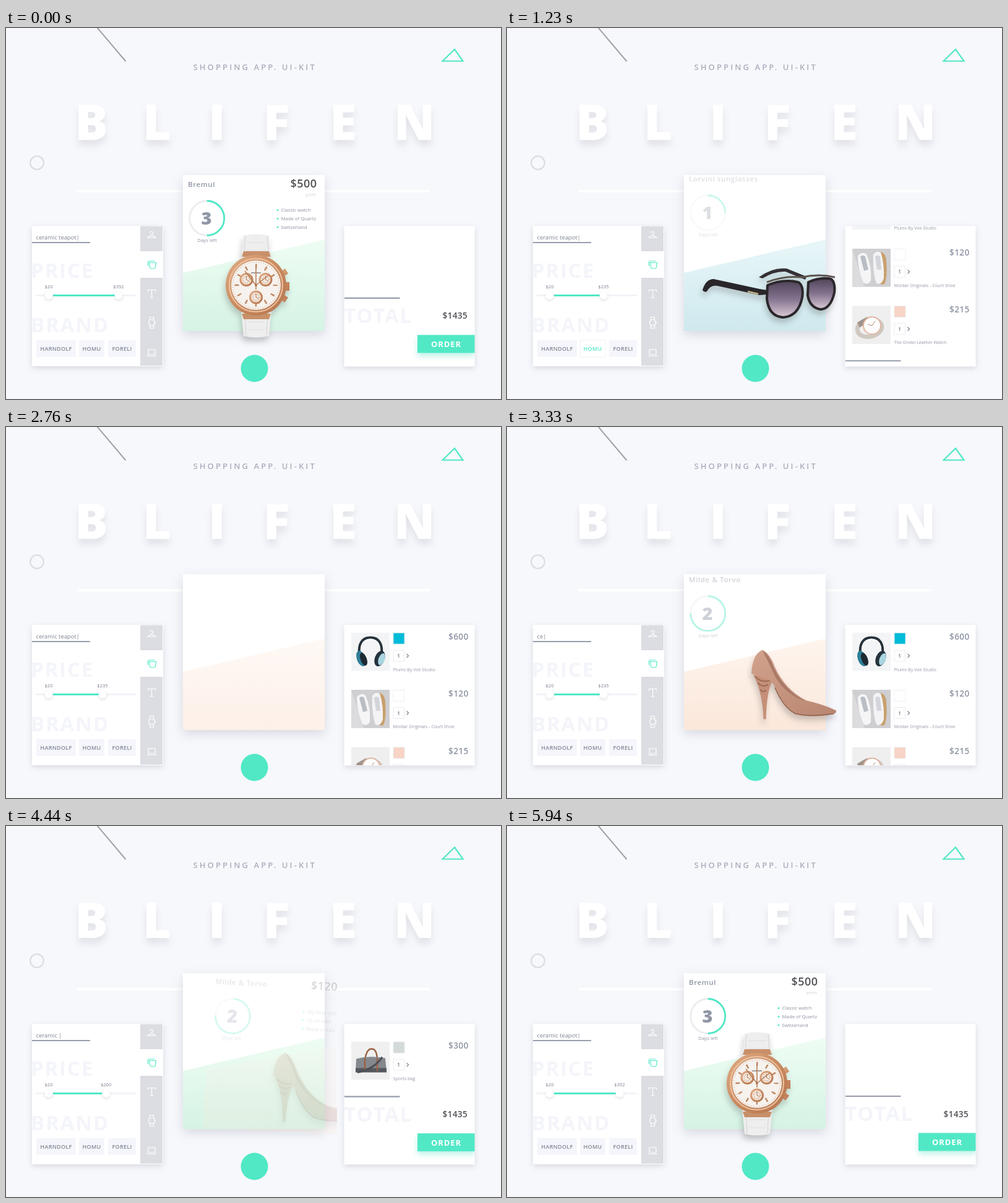
Animation, 800 px wide and 600 px high, one loop 5970 ms. Source, as an HTML page:

```html
<!DOCTYPE html>
<html lang="en">
<head>
<meta charset="utf-8">
<title>Shopping app UI kit</title>
<style>
html, body { margin: 0; width: 100%; height: 100%; overflow: hidden; background: #f7f8fc; }
svg { display: block; width: 800px; height: 600px; font-family: "Open Sans", "Noto Sans", sans-serif; }
.title { font-size: 80px; font-weight: 800; fill: #fff; text-anchor: middle; filter: drop-shadow(0 9px 6px rgba(70, 70, 80, .12)); }
.subtitle { font-size: 13px; font-weight: 600; letter-spacing: 3.1px; fill: #a9aebb; }
.card { fill: #fff; filter: drop-shadow(0 3px 5px rgba(70, 75, 95, .18)); }
.main { filter: drop-shadow(0 6px 9px rgba(70, 75, 95, .18)); }
.ghost { font-size: 33px; font-weight: 700; letter-spacing: 1.8px; fill: #f4f5fa; }
.rule { stroke: #989dad; stroke-width: 2.2; }
.query { font-size: 9.4px; fill: #7b8190; }
.tick { font-size: 7.6px; fill: #7b8190; text-anchor: middle; }
.knob { fill: #fff; filter: drop-shadow(0 2px 2px rgba(60, 60, 80, .16)); }
.tag { font-size: 9px; font-weight: 600; letter-spacing: .3px; text-anchor: middle; }
.icon { fill: none; stroke: #fff; stroke-width: 1.2; stroke-linejoin: round; stroke-linecap: round; }
.name { font-size: 11.5px; font-weight: 600; letter-spacing: .6px; fill: #8f96a4; }
.price { font-size: 18px; font-weight: 600; letter-spacing: .5px; fill: #515256; text-anchor: end; }
.old { font-size: 7.5px; fill: #dfe0e5; text-anchor: end; text-decoration: line-through; }
.note { font-size: 7.8px; fill: #8b919e; }
.days { font-size: 29px; font-weight: 800; fill: #8f96a5; text-anchor: middle; }
.mid { text-anchor: middle; }
.cost { font-size: 13.5px; font-weight: 600; letter-spacing: .4px; fill: #8d94a3; text-anchor: end; }
.label { font-size: 7.2px; fill: #9398a6; }
.qty { font-size: 8px; font-weight: 600; fill: #6f7583; text-anchor: middle; }
.total { font-size: 13.7px; font-weight: 600; letter-spacing: .3px; fill: #505257; text-anchor: end; }
.order { font-size: 13px; font-weight: 700; letter-spacing: .9px; fill: #fff; text-anchor: middle; }
.button { fill: #51e8c6; filter: drop-shadow(0 5px 5px rgba(60, 220, 185, .35)); }
.product { filter: drop-shadow(-2px 7px 5px rgba(60, 60, 60, .25)); }
</style>
</head>
<body>
<svg viewBox="0 0 800 600">
  <defs>
    <clipPath id="stageClip"><rect x="266" y="238" width="269" height="290"/></clipPath>
    <clipPath id="cartClip"><rect x="547" y="320" width="210.5" height="227"/></clipPath>
    <clipPath id="thumbClip"><rect width="62" height="62"/></clipPath>
    <linearGradient id="lens" x2="0" y2="1">
      <stop stop-color="#4f4459"/><stop offset=".5" stop-color="#85748f"/><stop offset="1" stop-color="#dccbd7"/>
    </linearGradient>
    <linearGradient id="gold" x2="1" y2="1">
      <stop stop-color="#e0ad86"/><stop offset=".5" stop-color="#c98a60"/><stop offset="1" stop-color="#b5764f"/>
    </linearGradient>
    <linearGradient id="skin" x2="1" y2="1">
      <stop stop-color="#d3a28c"/><stop offset="1" stop-color="#b88670"/>
    </linearGradient>
  </defs>

  <path d="M147 -1L193.500 54" stroke="#a1a2a7" stroke-width="2"/>
  <path d="M705.500 53.500L725 34.500L738.500 53.500Z" fill="none" stroke="#51e8c6" stroke-width="2.200"/>
  <circle cx="50" cy="218" r="10.800" fill="none" stroke="#dcdde2" stroke-width="2.200"/>
  <text class="subtitle" x="302.500" y="67.500">SHOPPING APP. UI-KIT</text>
  <text class="title" x="138 244 341 437 545 660" y="181">BLIFEN</text>
  <path d="M115 264H685.500" stroke="#fff" stroke-width="4"/>

  <g id="filterCard">
    <rect class="card" x="42" y="320" width="212" height="227"/>
    <text class="ghost" x="40" y="404">PRICE</text>
    <text class="ghost" x="40" y="492">BRAND</text>
    <text class="query" id="query" x="48.500" y="341.500"></text>
    <path class="rule" d="M42 347H136"/>
    <path d="M48 432.500H210" stroke="#f1f2f6" stroke-width="2.500"/>
    <path id="bar" stroke="#51e8c6" stroke-width="3"/>
    <circle class="knob" cx="69" cy="432.500" r="6.500"/>
    <circle class="knob" id="knob" cy="432.500" r="6.500"/>
    <text class="tick" x="69" y="421">$20</text>
    <text class="tick" id="limit" y="421"></text>
    <g id="tags"></g>
    <rect x="217" y="320.500" width="36" height="225.500" fill="#dcdde2"/>
    <rect x="217" y="361" width="36" height="43" fill="#fff"/>
    <g class="icon">
      <path d="M233 331.500a2.300 2.300 0 1 1 3.500 1.800q-1 .7-1 2l7 3.700H228.500l7-3.700"/>
      <path stroke="#51e8c6" d="M231.500 379.500h11l-1.200 8q-.3 1.500-1.800 1.500h-5q-1.500 0-1.800-1.500zM229.500 384.500V379q0-2 2-2h8.500"/>
      <path d="M229.500 426v-2.500h12V426M235.500 423.500v12.500M233 436h5"/>
      <path d="M232.500 471.500v-4h6v4M232.500 481.500v4h6v-4M241 475.500v2"/><circle cx="235.500" cy="476.500" r="5"/>
      <path d="M230 520h11v8h-11zM228 530.500h15"/>
    </g>
  </g>

  <g id="cart">
    <rect class="card" x="546.500" y="320" width="211" height="227.500"/>
    <g clip-path="url(#cartClip)">
      <g id="items"></g>
      <g id="summary">
        <path class="rule" d="M547 0H636.500"/>
        <text class="ghost" x="546" y="40">TOTAL</text>
        <text class="total" id="total" x="746" y="33.500"></text>
        <rect class="button" x="665" y="59.500" width="93" height="29"/>
        <text class="order" x="711.500" y="79">ORDER</text>
      </g>
    </g>
  </g>

  <rect class="card main" x="286" y="238" width="229" height="252"/>
  <g id="wedges"></g>
  <g id="slides" clip-path="url(#stageClip)"></g>
  <circle cx="401.500" cy="550.500" r="22" fill="#51e8c6"/>
</svg>

<script>
const LOOP = 5970;
const CARD_HOLD = 2760;
const PITCH = 92.5;
const $ = id => document.getElementById(id);
const clamp = v => Math.max(0, Math.min(1, v));
const span = (t, from, length) => clamp((t - from) / length);
const outQuad = p => 1 - (1 - p) ** 2;
const inOut = p => p < .5 ? 4 * p ** 3 : 1 - (2 - 2 * p) ** 3 / 2;
const mix = (a, b, p) => a + (b - a) * p;
const move = (el, x, y) => el.setAttribute('transform', `translate(${x} ${y})`);

const subdial = (x, y) => `<circle cx="${x}" cy="${y}" r="9.500" fill="#f4e9df" stroke="url(#gold)" stroke-width="3"/>
  <circle cx="${x}" cy="${y}" r="5.500" fill="none" stroke="#c79a78" stroke-width="2" stroke-dasharray="1 2"/>
  <path d="M${x} ${y - 6}V${y}L${x + 4} ${y + 2}" stroke="#a8724f" fill="none"/>`;

const watchArt = `
  <path d="M384 336Q404 331 425 336L428 376H380ZM380 456H429L425 498Q404 503 384 498Z" fill="#eeeeee"/>
  <path d="M387 337L384 374M422 337L425 374M386 460L388 497M423 460L421 497" stroke="#d4d3d2" fill="none"/>
  <path d="M390 347H419M389 360H420M391 475H418M391 488H418" stroke="#dededd"/>
  <path d="M381 370L384 361H425L428 370ZM381 462L384 471H425L428 462Z" fill="#c89069"/>
  <path d="M445 393L451 389L456 397L449 402ZM450 411H458V425H450ZM449 431L456 436L450 444L444 439Z" fill="url(#gold)"/>
  <circle cx="404" cy="416" r="49" fill="url(#gold)"/>
  <circle cx="404" cy="416" r="43" fill="none" stroke="#edc4a3" stroke-width="2"/>
  <circle cx="404" cy="416" r="40" fill="#f6f2ee"/>
  <circle cx="404" cy="416" r="37.500" fill="none" stroke="#bd9274" stroke-width="1.500" stroke-dasharray=".7 3.227"/>
  <circle cx="404" cy="416" r="31" fill="none" stroke="#c08a64" stroke-width="7" stroke-dasharray="2.500 13.730" stroke-dashoffset="1.250"/>
  <path d="M396 396H412" stroke="#8e8078" stroke-width="1.500"/>
  ${subdial(388.5, 407)}${subdial(419.5, 407)}${subdial(404, 435.5)}
  <path d="M404 416L386 393M404 416L424 400M404 423V385" stroke="#b27a54" stroke-width="1.500"/>
  <circle cx="404" cy="416" r="2" fill="#b27a54"/>`;

const glassesArt = `<g transform="translate(0 3)">
  <path d="M407 403Q430 386 452 389L484 402L482 407L450 394Q432 393 413 405Z" fill="#353035"/>
  <path d="M316 424Q321 406 334 406L408 422L420 424V431L408 432L340 417Q329 415 323 426Q319 428 316 424Z" fill="#29262a"/>
  <path d="M389 426L406 430" stroke="#c8b58b" stroke-width="2.500"/>
  <g fill="url(#lens)" stroke="#2b272b" stroke-width="4" stroke-linejoin="round">
    <path d="M421 416Q446 405 471 411Q480 417 477 436Q471 466 446 468Q423 466 420 438Z"/>
    <path d="M487 411Q508 402 524 406Q531 412 529 428Q523 454 507 455Q489 452 486 432Z"/>
  </g>
  <path d="M420 411Q448 400 476 403Q505 397 530 403" fill="none" stroke="#5d544f" stroke-width="3"/>
</g>`;

const shoeArt = `
  <path d="M398 402L430 411Q420 424 418.500 474H414.500Q413 430 398 402Z" fill="#c58f77"/>
  <path d="M401 405Q410 416 426 411M405 415Q414 424 422 418M409 426Q414 432 419 427" fill="none" stroke="#9c6b56" stroke-width="2"/>
  <path d="M395 400Q397 368 413 362Q425 368 433 390Q450 427 484 444Q508 449 532 460Q533 466 522 467Q490 472 466 466Q448 456 434 424Q427 408 412 407Z" fill="url(#skin)"/>
  <path d="M413 363Q424 370 431 390Q448 428 483 445Q452 436 434 406Q424 384 413 363Z" fill="#a97966"/>
  <path d="M433 423Q447 456 466 465Q490 471 528 465" fill="none" stroke="#93634f" stroke-width="1.500"/>`;

// Arc is the coloured share of the day ring.
const slides = [
  { name: 'Bremul', price: '$500', old: '$575', days: 3, arc: .5, notes: ['Classic watch', 'Made of Quartz', 'Switzerland'],
    art: watchArt, tint: ['#effdf3', '#d5f3e5'], enter: 4600, leave: 6000, leaveTime: 650, base: 3870 },
  { name: 'Lorvini sunglasses', price: '$430', old: '$520', days: 1, arc: .25, notes: ['Black frame', 'UV protection', 'Made in Italy'],
    art: glassesArt, tint: ['#e8f6f8', '#cfe9ee'], enter: 720, leave: 2480, leaveTime: 260, base: 30 },
  { name: 'Milde &amp; Torvo', price: '$1200', old: '$1650', days: 2, arc: .75, notes: ['Sky-blue colour', '12 cm heel', 'Made in Italy'],
    art: shoeArt, tint: ['#fef5ee', '#fbe7da'], enter: 2770, leave: 3870, leaveTime: 650, base: 2480 }
];

function group(parent, html) {
  const g = document.createElementNS('http://www.w3.org/2000/svg', 'g');
  g.innerHTML = html;
  parent.append(g);
  return g;
}

slides.forEach((s, i) => {
  const wedge = `<path d="M286 396L515 342V490H286Z" fill="url(#tint${i})"/>`;
  s.wedge = group($('wedges'), `<linearGradient id="tint${i}" x2="0" y2="1"><stop stop-color="${s.tint[0]}"/>
    <stop offset="1" stop-color="${s.tint[1]}"/></linearGradient>${wedge}`);
  s.node = group($('slides'), `<g>${wedge}</g>
    <g>
      <text class="name" x="294" y="257">${s.name}</text>
      <circle cx="324.700" cy="307.500" r="28" fill="none" stroke="#ececef" stroke-width="2.800"/>
      <circle cx="324.700" cy="307.500" r="28" fill="none" stroke="#51e8c6" stroke-width="2.800" pathLength="1"
        stroke-dasharray="${s.arc} 2" transform="rotate(-90 324.700 307.500)"/>
      <text class="days" x="324" y="318">${s.days}</text>
      <text class="note mid" x="325" y="346">Days left</text>
    </g>
    <g>
      <text class="price" x="502.500" y="257.500">${s.price}</text>
      <text class="old" x="501" y="272.500">${s.old}</text>
      ${s.notes.map((n, k) => `<circle cx="439" cy="${294.5 + 13.8 * k}" r="1.500" fill="#51e8c6"/>
        <text class="note" x="444.500" y="${297 + 13.8 * k}">${n}</text>`).join('')}
    </g>
    <g class="product">${s.art}</g>`);
  [s.ownWedge, s.info, s.offer, s.product] = s.node.children;
});

const items = [
  { label: 'Plums By Vok Studio', price: '$600', swatch: '#00bcd9', back: '#f3f4f5', art: `
    <path d="M13 38Q10 8 31 8Q52 8 49 38" fill="none" stroke="#26333c" stroke-width="4"/>
    <path d="M16 24Q20 11 31 11Q42 11 46 24" fill="none" stroke="#fff" stroke-width="2"/>
    <ellipse cx="16" cy="42" rx="7" ry="13" transform="rotate(-20 16 42)" fill="#2f7f98"/>
    <ellipse cx="20" cy="43" rx="5" ry="11" transform="rotate(-20 20 43)" fill="#1d2a33"/>
    <ellipse cx="46" cy="42" rx="8" ry="13" transform="rotate(20 46 42)" fill="#23323c"/>
    <ellipse cx="49" cy="43" rx="5" ry="10" transform="rotate(20 49 43)" fill="#a9d5e1"/>` },
  { label: 'Moldar Originals - Court Shoe', price: '$120', swatch: '#fff', back: '#cfced1', art: `
    <path d="M0 0L20 62H0Z" fill="#dcdbdd"/>
    <path d="M9 12Q15 4 23 9Q32 30 30 52Q25 60 18 55Q9 34 9 12Z" fill="#f5f5f6"/>
    <path d="M13 13Q17 9 21 13L26 34L19 36Z" fill="#b9bdc4"/>
    <path d="M43 5Q55 5 55 22Q57 46 52 57Q44 60 43 52Z" fill="#c8a06c"/>
    <path d="M34 10Q38 3 46 6Q52 24 51 48Q47 60 39 56Q33 40 34 10Z" fill="#f3f3f5"/>
    <path d="M37 13Q41 9 45 13L47 34H40Z" fill="#d3d5da"/>` },
  { label: 'The Ondel Leather Watch', price: '$215', swatch: '#f7d4c5', back: '#f0efef', art: `
    <ellipse cx="28" cy="36" rx="20" ry="14" transform="rotate(-12 28 36)" fill="none" stroke="#cfc8c1" stroke-width="7"/>
    <path d="M8 27L24 18L30 24L12 35Z" fill="#a0948b"/>
    <circle cx="32" cy="32" r="14" fill="#fdfdfd" stroke="#e0b7a2" stroke-width="2"/>
    <path d="M25 30L32 32L37 25" fill="none" stroke="#b58a77"/>` },
  { label: 'Sports bag', price: '$300', swatch: '#d4dad9', back: '#f0f0f1', art: `
    <path d="M22 30Q25 10 34 12Q42 13 42 32" fill="none" stroke="#9b6142" stroke-width="2.500"/>
    <path d="M8 28Q30 22 55 27L57 49H7Z" fill="#85888d"/>
    <path d="M7 43H57V50H7Z" fill="#55595f"/>
    <path d="M22 27V48M42 27V48" stroke="#9b6142" stroke-width="2.500"/>
    <path d="M10 50Q38 44 50 25" fill="none" stroke="#4c4f55" stroke-width="3"/>` }
];

items.forEach(item => {
  item.node = group($('items'), `
    <g transform="translate(558 0)" clip-path="url(#thumbClip)"><rect width="62" height="62" fill="${item.back}"/>${item.art}</g>
    <rect x="626" y=".500" width="18" height="18" fill="${item.swatch}" stroke="#e9eaee" stroke-width=".8"/>
    <rect x="626" y="28.500" width="17.500" height="18" fill="#fff" stroke="#ebecf0"/>
    <text class="qty" x="634.500" y="40.500">1</text>
    <path d="M647.500 34.500L650.500 37.500L647.500 40.500" fill="none" stroke="#7f8593" stroke-width="1.300"/>
    <text class="cost" x="747.500" y="11">${item.price}</text>
    <text class="label" x="625.500" y="62">${item.label}</text>`);
});

[['HARNDOLF', 49, 64], ['HOMU', 118, 41], ['FORELI', 165, 45]].forEach(([word, x, w]) =>
  group($('tags'), `<rect x="${x}" y="505" width="${w}" height="27" fill="#f5f6fb"/>
    <text class="tag" x="${x + w / 2}" y="522" fill="#7f8696">${word}</text>`));
const picked = group($('tags'), `<rect x="118.500" y="505" width="40.500" height="27" fill="#fff" stroke="#f0f1f6"/>
  <text class="tag" x="138.500" y="522" fill="#51e8c6">HOMU</text>`);

const knobStops = [[0, 182], [60, 182], [300, 144], [510, 156], [4300, 156], [4700, 188], [5480, 188], [5700, 174], [5900, 182], [LOOP, 182]];

function knobX(t) {
  const i = knobStops.findIndex(stop => stop[0] > t);
  const [[t0, x0], [t1, x1]] = [knobStops[i - 1], knobStops[i]];
  return mix(x0, x1, inOut(span(t, t0, t1 - t0)));
}

function drawFilter(t) {
  const word = 'ceramic teapot';
  const count = t < 2790 ? 14
    : t < 3030 ? Math.max(0, 14 - Math.floor((t - 2790) / 15))
    : Math.min(14, 1 + Math.floor((t - 3030) / 182));
  $('query').textContent = word.slice(0, count) + '|';
  const x = knobX(t);
  $('knob').setAttribute('cx', x);
  $('bar').setAttribute('d', `M76 432.500H${x - 5}`);
  $('limit').setAttribute('x', x);
  $('limit').textContent = '$' + Math.round(235 + 4.5 * (x - 156));
  picked.setAttribute('opacity', span(t, 1020, 160) - span(t, 1540, 180));
}

function drawCart(t) {
  const removed = t < CARD_HOLD ? inOut(span(t, -30, 550)) : 0;
  const scroll = t < CARD_HOLD
    ? mix(mix(70.5, 73, removed), 332.5, inOut(span(t, 575, 1100)))
    : mix(332.5, 70.5, inOut(span(t, 3660, 852)));
  const swipe = inOut(span(t, 5270, 630));
  items.forEach((item, i) => move(item.node, i === 3 ? -215 * swipe : 0, scroll + PITCH * i));
  items[3].node.style.display = t > CARD_HOLD && swipe < 1 ? '' : 'none';
  move($('summary'), 0, scroll + 274 + PITCH * (1 - removed));
  $('total').textContent = '$' + Math.round(1435 - 300 * removed);
}

function drawSlide(s, now) {
  const t = s.leave > LOOP && now < 1000 ? now + LOOP : now;
  const gone = span(t, s.leave, s.leaveTime) ** 2;
  const leaving = t >= s.leave;
  const arrive = span(t, s.enter, 700);
  const info = span(t, s.enter + 390, 400);
  const offer = span(t, s.enter + 680, 550);
  s.wedge.setAttribute('opacity', leaving ? 0 : span(t, s.base, s.leaveTime * .7));
  s.ownWedge.setAttribute('opacity', leaving ? 1 : 0);
  s.node.style.display = t < s.enter || gone === 1 ? 'none' : '';
  s.node.setAttribute('opacity', 1 - gone);
  s.node.setAttribute('transform', `translate(${50 * gone} ${5 * gone}) rotate(${3.9 * gone} 400 364)`);
  s.product.setAttribute('opacity', Math.min(1, arrive * 1.9));
  move(s.product, 0, -40 * (1 - outQuad(arrive)));
  s.info.setAttribute('opacity', info);
  move(s.info, 0, -18 * (1 - outQuad(info)));
  s.offer.setAttribute('opacity', offer);
  move(s.offer, 0, -14 * (1 - outQuad(offer)));
}

const start = performance.now();
function frame() {
  const t = (performance.now() - start) % LOOP;
  drawFilter(t);
  drawCart(t);
  slides.forEach(s => drawSlide(s, t));
  requestAnimationFrame(frame);
}
frame();
</script>
</body>
</html>
```
